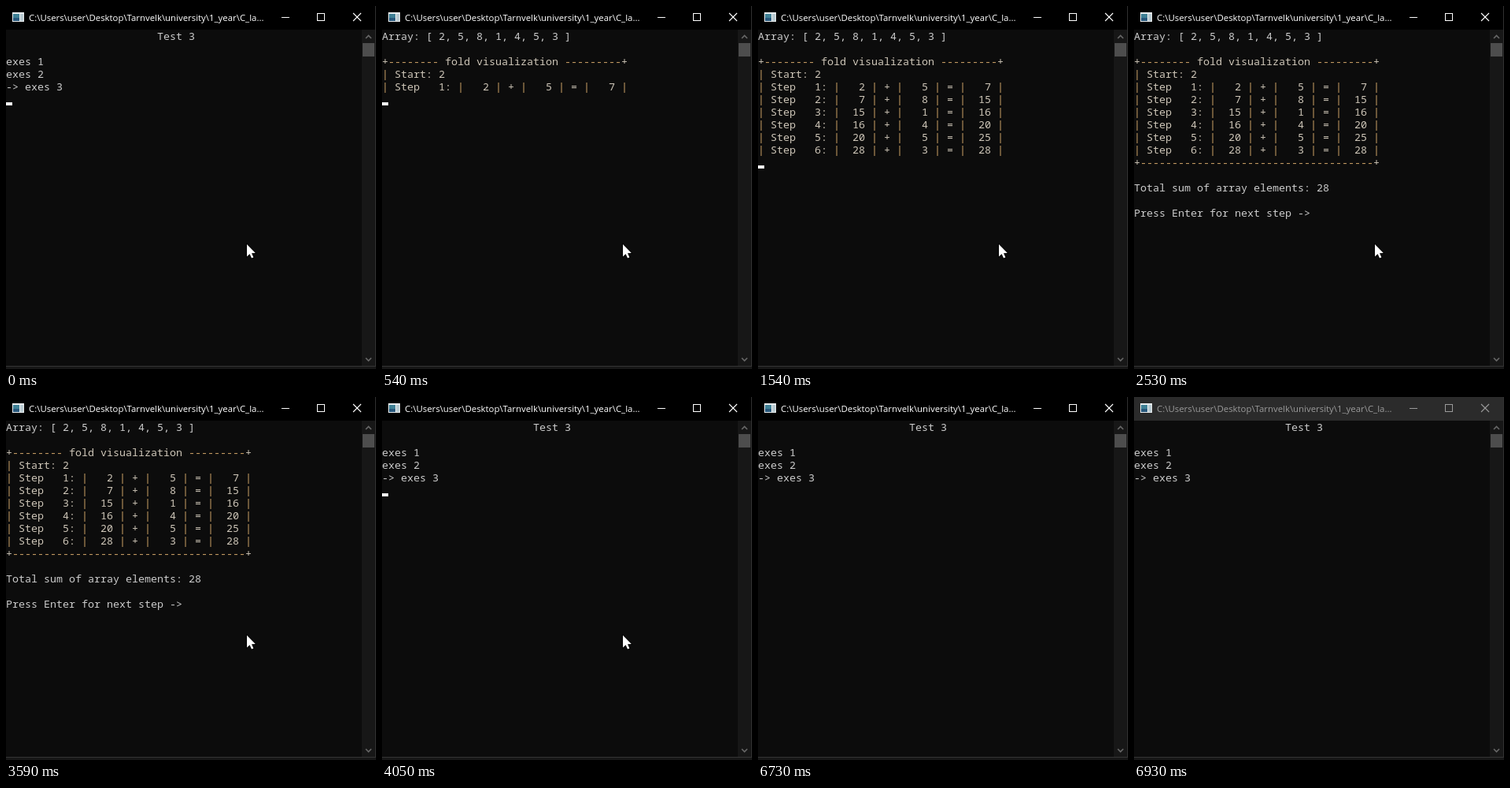
An HTML page with a canvas that plays this animation: 470x460 px, repeating every 7.06 s.

```html
<!DOCTYPE html>
<html lang="en">
<head>
<meta charset="utf-8">
<title>Console fold demo</title>
<style>
  html, body { margin: 0; width: 470px; height: 460px; overflow: hidden; background: #0c0c0c; }
  canvas { display: block; }
</style>
</head>
<body>
<canvas id="stage" width="470" height="460"></canvas>
<script>
const ctx = document.getElementById('stage').getContext('2d', { alpha: false });

const LOOP = 7060;
const CELL = 8, ROW = 16, TOP = 30;
const MONO = '13.333px "Noto Sans Mono", "DejaVu Sans Mono", monospace';
const SANS = '11.4px "Open Sans", "Noto Sans", sans-serif';
const TITLE = 'C:\\Users\\user\\Desktop\\Tarnvelk\\university\\1_year\\C_la...';

const RUN = 400, FIRST_STEP = 540, STEP = 200, DONE = 1740, MENU = 4050;
const MOUSE_GO = 5640, BLUR = 6930;
// The caret is hidden between each pair of times.
const CARET_OFF = [[2530, 3060], [3590, 4050], [4650, 5180], [5710, 6200], [6730, LOOP]];
const MOUSE_PATH = [[317, 318], [352, 366], [415, 448]];

const values = [2, 5, 8, 1, 4, 5, 3];
const menu = [' '.repeat(24) + 'Test 3', '', 'exes 1', 'exes 2', '-> exes 3', ''];
const intro = [
  `Array: [ ${values.join(', ')} ]`,
  '',
  '+-------- fold visualization ---------+',
  `| Start: ${values[0]}`
];
const steps = foldSteps();
const outro = [
  `+${'-'.repeat(37)}+`,
  '',
  'Total sum of array elements: 28',
  '',
  'Press Enter for next step -> '
];

function foldSteps() {
  const pad = n => String(n).padStart(4);
  let sum = values[0];
  return values.slice(1).map((v, i, rest) => {
    const before = sum;
    sum += v;
    // The last row prints the finished sum on the left as well.
    const left = i === rest.length - 1 ? sum : before;
    return `| Step ${pad(i + 1).slice(1)}: |${pad(left)} | + |${pad(v)} | = |${pad(sum)} |`
      .replace('Step ', 'Step ');
  });
}

// The caret stands at the end of the last line.
function screenAt(t) {
  if (t < RUN || t >= MENU) return menu;
  if (t < RUN + 70) return [intro[0], ''];
  if (t < FIRST_STEP) return [...intro, ''];
  if (t >= DONE) return [...intro, ...steps, ...outro];
  const count = 1 + Math.floor((t - FIRST_STEP) / STEP);
  return [...intro, ...steps.slice(0, count), ''];
}

function rect(x, y, w, h, color) {
  ctx.fillStyle = color;
  ctx.fillRect(x, y, w, h);
}

function text(str, x, y, font, color) {
  ctx.font = font;
  ctx.fillStyle = color;
  ctx.fillText(str, x, y);
}

function line(points, color, width = 1) {
  ctx.beginPath();
  points.forEach(([x, y]) => ctx.lineTo(x, y));
  ctx.strokeStyle = color;
  ctx.lineWidth = width;
  ctx.stroke();
}

function drawTitleBar(active) {
  const ink = active ? '#ffffff' : '#9a9a9a';
  rect(0, 0, 469, 30, active ? '#000000' : '#2b2b2b');

  rect(8, 8, 15, 12, '#e8ecee');
  rect(9, 10, 8, 9, '#3f8196');
  rect(9, 15, 8, 4, '#28587c');
  rect(18, 10, 4, 9, '#b9cbd2');

  text(TITLE, 29, 19, SANS, ink);
  rect(350, 14, 10, 1, ink);
  ctx.strokeStyle = ink;
  ctx.lineWidth = 1;
  ctx.strokeRect(395.5, 9.5, 9, 9);
  line([[441, 9], [451, 19]], ink, 1.1);
  line([[451, 9], [441, 19]], ink, 1.1);
}

function drawFrame() {
  rect(452, 30, 17, 426, '#171717');
  rect(453, 47, 15, 17, '#4d4d4d');
  line([[457, 41], [460.5, 37.5], [464, 41]], '#676767', 1.6);
  line([[457, 446], [460.5, 449.5], [464, 446]], '#676767', 1.6);
  rect(0, 457, 470, 3, '#171717');
  rect(0, 456, 470, 1, '#353535');
  rect(469, 0, 1, 457, '#303030');
}

function drawLine(str, row) {
  const y = TOP + row * ROW + 13;
  if (!/^[|+]/.test(str)) return text(str, 0, y, MONO, '#cccccc');
  text(str.replace(/[|-]/g, ' '), 0, y, MONO, '#cec6b8');
  text(str.replace(/[^|-]/g, ' '), 0, y, MONO, '#cfa468');
}

function drawCaret(lines) {
  const row = lines.length - 1;
  rect(lines[row].length * CELL, TOP + row * ROW + 12, CELL, 4, '#f2f2f2');
}

function drawMouse(t) {
  const i = Math.floor((t - MOUSE_GO) / 70);
  const pos = i < 0 ? [306, 302] : MOUSE_PATH[i];
  if (!pos) return;
  ctx.save();
  ctx.translate(pos[0], pos[1]);
  ctx.beginPath();
  [[0, 0], [0, 15.5], [3.6, 12.2], [6, 17.5], [8.4, 16.5], [6, 11.2], [10.8, 11]]
    .forEach(([x, y]) => ctx.lineTo(x, y));
  ctx.closePath();
  ctx.lineWidth = 1.5;
  ctx.strokeStyle = '#000000';
  ctx.stroke();
  ctx.fillStyle = '#ffffff';
  ctx.fill();
  ctx.restore();
}

function draw(t) {
  const lines = screenAt(t);
  rect(0, 0, 470, 460, '#0c0c0c');
  drawTitleBar(t < BLUR);
  lines.forEach(drawLine);
  if (!CARET_OFF.some(([from, to]) => t >= from && t < to)) drawCaret(lines);
  drawFrame();
  drawMouse(t);
}

const start = performance.now();
function tick() {
  draw((performance.now() - start) % LOOP);
  requestAnimationFrame(tick);
}
tick();
</script>
</body>
</html>
```
